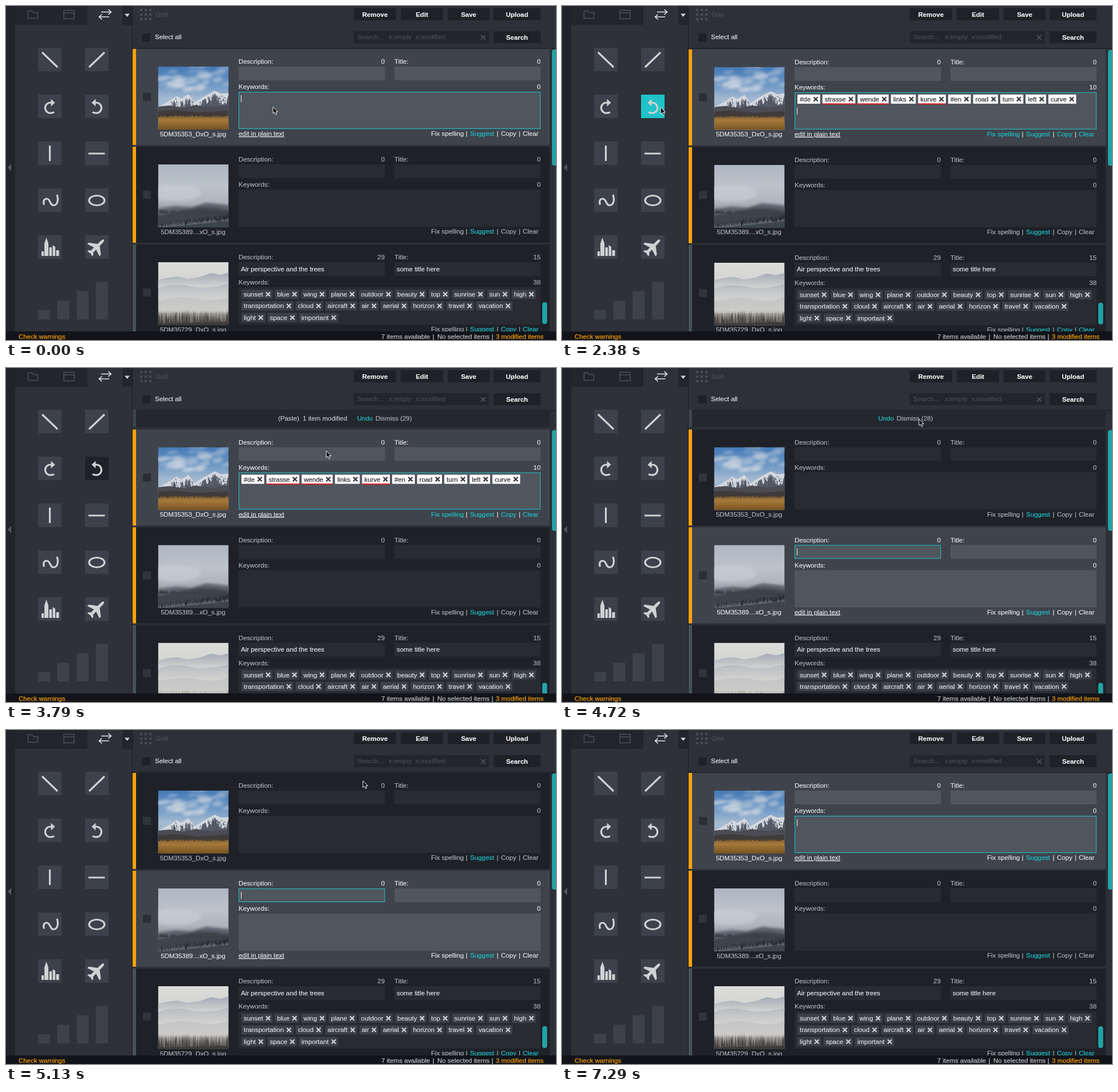
An HTML page that plays this animation: 960x584 px, repeating every 7.54 s.

```html
<!DOCTYPE html>
<html lang="en">
<head>
<meta charset="utf-8">
<title>Keyword editor</title>
<style>
  html, body { margin: 0; width: 100%; height: 100%; overflow: hidden; background: #2d3038; }
  svg { display: block; }
  #stage { width: 100%; height: 100%; }
  text { font: 11.45px "Liberation Sans", Arial, sans-serif; white-space: pre; stroke-width: .2px; }
  .bold { font-weight: bold; }
  .end { text-anchor: end; }
  .mid { text-anchor: middle; }
  .under { text-decoration: underline; }
</style>
</head>
<body>
<svg id="stage" viewBox="0 0 960 584"></svg>
<script>
const LOOP = 7540;
const TEAL = '#1fc3c8', ORANGE = '#ffa10a', PANEL = '#2e3138', DARK = '#1f2127',
      TOOL = '#3d414b', ICON = '#cfd1d3', LIGHT = '#e2e3e5', GREY = '#abaeb3';

// Markup helpers; the y of a label is the middle of its line.
const box = (x, y, w, h, fill, more = '') =>
  `<rect x="${x}" y="${y}" width="${w}" height="${h}" fill="${fill}" ${more}/>`;
const label = (x, y, str, fill, cls = '') =>
  `<text x="${x}" y="${y + 4}" fill="${fill}" stroke="${fill}" class="${cls}">${str}</text>`;
const shape = (d, fill, more = '') => `<path d="${d}" fill="${fill}" ${more}/>`;
const line = (d, stroke, width) =>
  `<path d="${d}" fill="none" stroke="${stroke}" stroke-width="${width}"/>`;
const cross = (x, y, r, color, width) =>
  line(`M${x - r} ${y - r}l${2 * r} ${2 * r}m0 ${-2 * r}l${-2 * r} ${2 * r}`, color, width);
const gradient = (id, ...stops) => `<linearGradient id="${id}" x2="0" y2="1">` +
  stops.map(([at, color]) => `<stop offset="${at}" stop-color="${color}"/>`).join('') + '</linearGradient>';
const seeded = s => () => (s = s * 16807 % 2147483647) / 2147483647;
const repeat = (n, make) => Array.from({ length: n }, (_, i) => make(i)).join('');

const ruler = document.createElement('canvas').getContext('2d');
ruler.font = '11.45px "Liberation Sans", Arial, sans-serif';

// ---- Photos, 123 x 110 ----
function trees(seed, n, baseOf, minH, maxH, color) {
  const rnd = seeded(seed);
  return shape(repeat(n, () => {
    const x = rnd() * 123, h = minH + rnd() * (maxH - minH);
    return `M${x.toFixed(1)} ${baseOf(x).toFixed(1)}l.9 ${-h.toFixed(1)}l.9 ${h.toFixed(1)}z`;
  }), color);
}

function mountains() {
  const rnd = seeded(41);
  const ridge = [[0, 70], [22, 58], [32, 51], [40, 56], [53, 48], [64, 62], [80, 52], [99, 42], [110, 47], [123, 46]];
  const heightAt = x => {
    const i = Math.max(1, ridge.findIndex(p => p[0] >= x)), [a, b] = [ridge[i - 1], ridge[i]];
    return a[1] + (b[1] - a[1]) * (x - a[0]) / (b[0] - a[0]);
  };
  const top = 'M' + ridge.join('L');
  const jagged = repeat(62, i => {
    const x = 123 - i * 2;
    return `L${x} ${(heightAt(x) + 3 + rnd() * 17).toFixed(1)}`;
  });
  const rocks = repeat(110, () => {
    const x = 4 + rnd() * 114, y = heightAt(x) + 2 + rnd() * 15;
    return `M${x.toFixed(1)} ${y.toFixed(1)}l${(1 + rnd() * 4).toFixed(1)} ${(3 + rnd() * 5).toFixed(1)}l-3 -2z`;
  });
  const clouds = repeat(34, () =>
    `<ellipse cx="${rnd() * 123}" cy="${2 + rnd() * 50}" rx="${5 + rnd() * 14}" ry="${1.5 + rnd() * 4}"
      fill="#d3d9e1" opacity="${.25 + rnd() * .4}" transform="rotate(-8)"/>`);
  return box(0, 0, 123, 110, 'url(#sky)') + `<g filter="url(#soft)">${clouds}</g>` +
    shape(top + 'V95H0Z', '#525866') + shape(top + jagged + 'Z', '#d3d8e0') + shape(rocks, '#646b79') +
    shape('M0 70L20 68L45 72L66 67L92 71L123 67V92H0Z', '#4b4b54') +
    shape('M0 78L30 76L70 80L123 77V92H0Z', '#403a39') +
    box(0, 86, 123, 24, 'url(#field)') + trees(7, 70, () => 88, 1, 4, '#3a322d');
}

function fog() {
  return box(0, 0, 123, 110, 'url(#mist)') +
    '<g filter="url(#soft)">' +
    '<ellipse cx="30" cy="50" rx="45" ry="14" fill="#cdd1d6" opacity=".55"/>' +
    shape('M-5 78L30 73L58 75L84 67L130 72V115H-5Z', '#5d646e') +
    shape('M-5 89L38 81L70 75L100 76L130 81V115H-5Z', '#3e444c') + '</g>' +
    trees(13, 190, x => 85 + x / 40, 2, 8, '#3a4048') +
    trees(23, 240, x => 111 - x / 8, 3, 12, '#262b31') +
    trees(29, 150, x => 111 - x / 10, 2, 9, '#60666f');
}

function haze() {
  return box(0, 0, 123, 110, 'url(#dawn)') +
    shape('M0 31L16 27L34 25L52 29L72 26L92 19L108 22L123 18V46H0Z', 'url(#hill)') +
    shape('M0 45Q28 36 56 42T123 38V66H0Z', 'url(#hill)', 'opacity=".6"') +
    shape('M0 67Q40 58 70 64T123 60V88H0Z', 'url(#hill)', 'opacity=".35"') +
    trees(31, 190, () => 108, 8, 25, '#8b8681') + trees(37, 200, () => 111, 8, 29, '#4a4643') +
    shape('M0 107L123 104V110H0Z', '#403c3a');
}

const defs = '<defs><filter id="soft"><feGaussianBlur stdDeviation="2"/></filter>' +
  '<clipPath id="frame"><rect width="123" height="110"/></clipPath>' +
  gradient('sky', [0, '#4479b5'], [.3, '#6f99c6'], [.5, '#a3b9d1']) +
  gradient('field', [0, '#7d5f35'], [.3, '#a67a3b'], [1, '#775322']) +
  gradient('mist', [0, '#aeb6c2'], [.35, '#bcc3cc'], [.6, '#adb4bd'], [1, '#5a616b']) +
  gradient('dawn', [0, '#dcdddb'], [.2, '#d7d8d6'], [.55, '#d2d1cd'], [.76, '#cac8c3'], [.86, '#98938e'], [1, '#6b6662']) +
  gradient('hill', [0, '#a4abb7'], [1, '#d6d6d3']) +
  [mountains(), fog(), haze()].map((art, i) => `<g id="photo${i}" clip-path="url(#frame)">${art}</g>`).join('') +
  '</defs>';

// ---- Item cards ----
const pasted = ['#de strasse! wende! links kurve! #en road turn left curve'];
const scenic = ['sunset blue wing plane outdoor beauty top sunrise sun high',
  'transportation cloud aircraft air aerial horizon travel vacation', 'light space important'];
const items = [
  { name: '5DM35353_DxO_s.jpg', counts: [0, 0, 0], edge: ORANGE },
  { name: '5DM35389…xO_s.jpg', counts: [0, 0, 0], edge: ORANGE },
  { name: '5DM35729_DxO_s.jpg', counts: [29, 15, 38], edge: '#465256', rows: scenic,
    desc: 'Air perspective and the trees', title: 'some title here' },
];

// A trailing "!" marks a misspelt word.
function tags(rows, bright) {
  const [bg, ink, mark] = bright ? ['#fff', '#25282e', '#33363c'] : ['#3b4049', '#dddee1', '#cccdd1'];
  return rows.map((row, r) => {
    let x = 411, out = '';
    const y = 87 + r * 20.4;
    for (const entry of row.split(' ')) {
      const word = entry.replace('!', ''), w = ruler.measureText(word).width + .5;
      out += box(x, y - 8, w + 20, 16, bg) + label(x + 4, y, word, ink) + cross(x + w + 12.3, y, 3.6, mark, 2.2);
      if (word !== entry) out += box(x, y + 7.5, w + 20, 2, '#d8232a');
      x += w + 24;
    }
    return out;
  }).join('');
}

function card(index, focus, withPaste) {
  const { name, counts, edge, rows, desc, title } = items[index];
  const filled = withPaste ? pasted : rows;
  const ink = focus ? LIGHT : GREY, field = focus ? '#50565e' : '#282b32';
  const input = (x, y, w, h, id) => id === focus
    ? box(x + .5, y + .5, w - 1, h - 1, field, `stroke="${TEAL}"`) : box(x, y, w, h, field);
  const actions = [[742, 'Fix spelling', withPaste], [810, 'Suggest', true], [864, 'Copy', filled], [902, 'Clear', filled]];
  return `<g transform="translate(0 ${75 + index * 171})">` +
    box(221, 0, 6, 168, edge) + box(227, 0, 722, 168, focus ? '#3f434c' : '#1e2128') +
    box(239, 77, 14, 14, focus ? '#2b2e35' : '#30343b') +
    `<use href="#photo${index}" x="265.5" y="31"/>` + label(326.5, 148.5, name, ink, 'mid') +
    label(406, 22, 'Description:', ink) + label(661, 22, counts[0], ink, 'end') +
    label(678, 22, 'Title:', ink) + label(933, 22, counts[1], ink, 'end') +
    input(406, 31, 255.5, 24, 'desc') + input(678, 31, 255, 24, 'title') +
    label(406, 66, 'Keywords:', ink) + label(933, 66, withPaste ? 10 : counts[2], ink, 'end') +
    input(406, 75, 527, 65, 'keys') +
    (desc ? label(410, 42.5, desc, LIGHT) + label(682, 42.5, title, LIGHT) : '') +
    (filled ? tags(filled, withPaste) : '') +
    (rows ? box(936, 101, 8.5, 38, '#23a3a5', 'rx="4"') : '') +
    (focus ? label(406, 148, 'edit in plain text', LIGHT, 'under') : '') +
    actions.map(([x, str, on]) => label(x, 148, str, on ? TEAL : ink)).join('') +
    [804, 858, 896.5].map(x => label(x, 148, '|', ink, 'mid')).join('') + '</g>';
}

// ---- Fixed chrome ----
const rotateIcon = shape('M78.5 162.5L85.5 169L78.5 175.5Z', ICON) +
  line('M84 185.5Q81.5 187.2 77.5 187.2A9 9 0 0 1 77.5 169H79.5', ICON, 3.2);

function sidebar() {
  const slots = repeat(10, i => box(56 + i % 2 * 82, 73 + (i >> 1) * 82, 41, 41, TOOL, `id="tool${i}"`));
  const plane = 'M0-19C1.8-19 2.6-15.500 2.6-12V-6L15 3.500V7L2.600 3V10L6 13.500V16L0 14.500L-6 16V13.500L-2.600 10V3L-15 7V3.500L-2.600-6V-12C-2.600-15.500-1.800-19 0-19Z';
  return box(0, 0, 16, 569, '#20232a') + shape('M9 276v13l-6-6.5z', '#555860') +
    box(16, 0, 204, 569, PANEL) + box(16, 0, 126, 33, '#22252c') + box(203, 0, 17, 33, '#22252c') +
    box(220, 0, 1, 569, '#1b1d22') +
    line('M38.5 21.5V8.5H45.5L47.5 11.5H55.5V21.5Z', '#4b4f58', 1.5) +
    line('M101 7.5H119V22.5H101ZM101 12H119', '#4b4f58', 1.5) +
    line('M166 10.5H183M178.5 6L183.5 10.5L178.5 15M180 19H163M167.5 14.5L162.500 19L167.5 23.5', '#e4e5e6', 1.6) +
    shape('M207 13.5h9l-4.5 5.5z', '#d0d2d4') + slots +
    line('M63 81L90 107M145 107L172 81M76.5 244V271M144 258H172.5', ICON, 3.2) +
    rotateIcon + `<g transform="translate(235 0) scale(-1 1)">${rotateIcon}</g>` +
    line('M66.5 347.500C64 341 67 337 71 337C78 337 76 348.500 83 348.500C90 348.500 92 339 89 330', ICON, 3.2) +
    `<ellipse cx="158.5" cy="340" rx="13.5" ry="8.5" fill="none" stroke="${ICON}" stroke-width="3.2"/>` +
    shape('M62 437V429H66V437ZM67 437V415L70.5 405L74 415V437ZM75.5 437V422H80V437ZM81.5 437V418L86 421V437ZM87.5 437V427H92.5V437Z', ICON) +
    shape(plane, ICON, 'transform="translate(157.5 422) rotate(45)"') +
    repeat(4, i => box(56 + i * 33.6, 532 - i * 16.6, 21, 16 + i * 16.6, TOOL));
}

function header() {
  const button = (x, y, w, str) => box(x, y, w, 21, DARK) + label(x + w / 2, y + 10.5, str, '#f0f0f1', 'bold mid');
  return box(221, 0, 739, 73, '#2d3038') + box(221, 73, 739, 2, '#22252b') +
    repeat(9, i => box(234 + i % 3 * 8, 5 + (i / 3 | 0) * 8, 4, 4, '#494c54')) +
    label(261, 15, 'Grid', '#4d5058') +
    button(607, 4, 74, 'Remove') + button(689, 4, 74, 'Edit') + button(771, 4, 73, 'Save') +
    button(851, 4, 82, 'Upload') + button(851, 44, 82, 'Search') +
    box(238, 48, 14, 14, DARK) + label(260, 54, 'Select all', LIGHT) +
    box(607, 44, 236, 21, '#22252b') + label(613, 54, 'Search...', '#4b4e56') +
    label(668, 54, 'x:empty', '#4b4e56') + label(715, 54, 'x:modified', '#4b4e56') + cross(833, 55, 4, '#555860', 1.6);
}

const footer = () => box(0, 569, 960, 15, '#121419') + label(22, 578, 'Check warnings', ORANGE) +
  label(655, 578, '7 items available', '#c4c6c9') + label(746, 578, '|', '#c4c6c9', 'mid') +
  label(753, 578, 'No selected items', '#c4c6c9') + label(849, 578, '|', '#c4c6c9', 'mid') +
  label(855, 578, '3 modified items', ORANGE);

const stage = document.getElementById('stage');
stage.innerHTML = defs + box(0, 0, 960, 584, '#2d3038') + '<g id="list"></g>' + sidebar() + header() +
  box(953, 76, 10, 203, '#23a3a5', 'id="thumb" rx="4"') +
  '<svg id="notice" x="221" y="73" width="728" height="0"></svg>' + footer() +
  box(410, 0, 1, 12, '#f4f4f4', 'id="caret"') +
  shape('M0 0V11.5L2.7 9.2L4.6 13.5L6.7 12.6L4.9 8.4H8.5Z', '#0c0c0e', 'id="cursor" stroke="#f4f4f4"');
const el = id => document.getElementById(id);
const set = (id, name, value) => el(id).setAttribute(name, value);

// ---- Timeline ----
const stepAt = (table, t) => table.reduce((value, [at, next]) => t >= at ? next : value, table[0][1]);
const smooth = p => p * p * (3 - 2 * p), linear = p => p;

const scenes = [[0, 0], [2290, 1], [4720, 2], [6290, 0]];
const shifts = [[0, 0], [2380, .8], [2500, 11.2], [2680, 32.5], [4840, 30], [4950, 19], [5130, 0]];
const seconds = [[0, 30], [3390, 29], [4370, 28]];
const toolFill = [[0, TOOL], [1640, TEAL], [3060, DARK], [4720, TOOL]];
const blinks = [450, 950, 1450, 1930, 2910, 3390, 3790, 4280, 5420, 5920, 6790, 7290];
const caretTop = [156, 177, 283];

// Pointer legs: first step, last step, number of steps, end point, easing.
const legs = [
  [450, 450, 1, 480, 172], [630, 630, 1, 492, 163], [810, 810, 1, 497, 156], [902, 902, 1, 494, 151],
  [995, 1550, 7, 179, 175, smooth], [1640, 1640, 1, 174, 177], [1760, 1760, 1, 172, 177],
  [3060, 3790, 8, 559, 145, smooth], [3880, 4370, 6, 623, 89, smooth],
  [5280, 5280, 1, 645, 142], [5420, 5420, 1, 641, 141], [5600, 6020, 5, 636.5, 168.5, smooth],
  [6560, 6560, 1, 639, 170.5], [6710, 7120, 5, 1014, 666],
];
function pointerAt(t) {
  let x = 466, y = 176.5;
  for (const [start, end, steps, toX, toY, ease = linear] of legs) {
    if (t < start) break;
    const done = steps > 1 ? Math.min(steps - 1, Math.floor((t - start) / (end - start) * (steps - 1))) : 0;
    const p = ease((done + 1) / steps);
    x += (toX - x) * p;
    y += (toY - y) * p;
  }
  return [x, y];
}

function notice(scene, left, height) {
  const y = height / 2, [undo, dismiss] = scene === 1 ? [392, 424] : [331, 363];
  return box(0, 0, 728, height, '#24272d') + box(0, 0, 6, height, '#3b4448') +
    (scene === 1 ? label(254, y, '(Paste)', '#c3c5c9') + label(297, y, '1 item modified', '#c3c5c9') : '') +
    label(undo, y, 'Undo', TEAL) + label(dismiss, y, `Dismiss (${left})`, GREY);
}

let shownScene = -1, shownNotice = '';
function draw(t) {
  const scene = stepAt(scenes, t), shift = stepAt(shifts, t), left = stepAt(seconds, t);
  if (scene !== shownScene) {
    shownScene = scene;
    el('list').innerHTML = card(0, scene < 2 && 'keys', scene === 1) + card(1, scene === 2 && 'desc') + card(2);
  }
  set('list', 'transform', `translate(0 ${shift})`);
  set('thumb', 'y', 76 + shift);
  set('thumb', 'height', 203 - shift * .82);

  const height = Math.max(0, shift - 2), key = [scene, left, height].join();
  if (key !== shownNotice) {
    shownNotice = key;
    set('notice', 'height', height);
    set('notice', 'visibility', height ? 'visible' : 'hidden');
    el('notice').innerHTML = notice(scene, left, height);
  }
  set('tool3', 'fill', stepAt(toolFill, t));
  set('caret', 'y', caretTop[scene] + shift);
  set('caret', 'visibility', blinks.filter(at => t >= at).length % 2 ? 'hidden' : 'visible');
  set('cursor', 'transform', `translate(${pointerAt(t)})`);
}

function tick() {
  draw(performance.now() % LOOP);
  requestAnimationFrame(tick);
}
tick();
</script>
</body>
</html>
```
